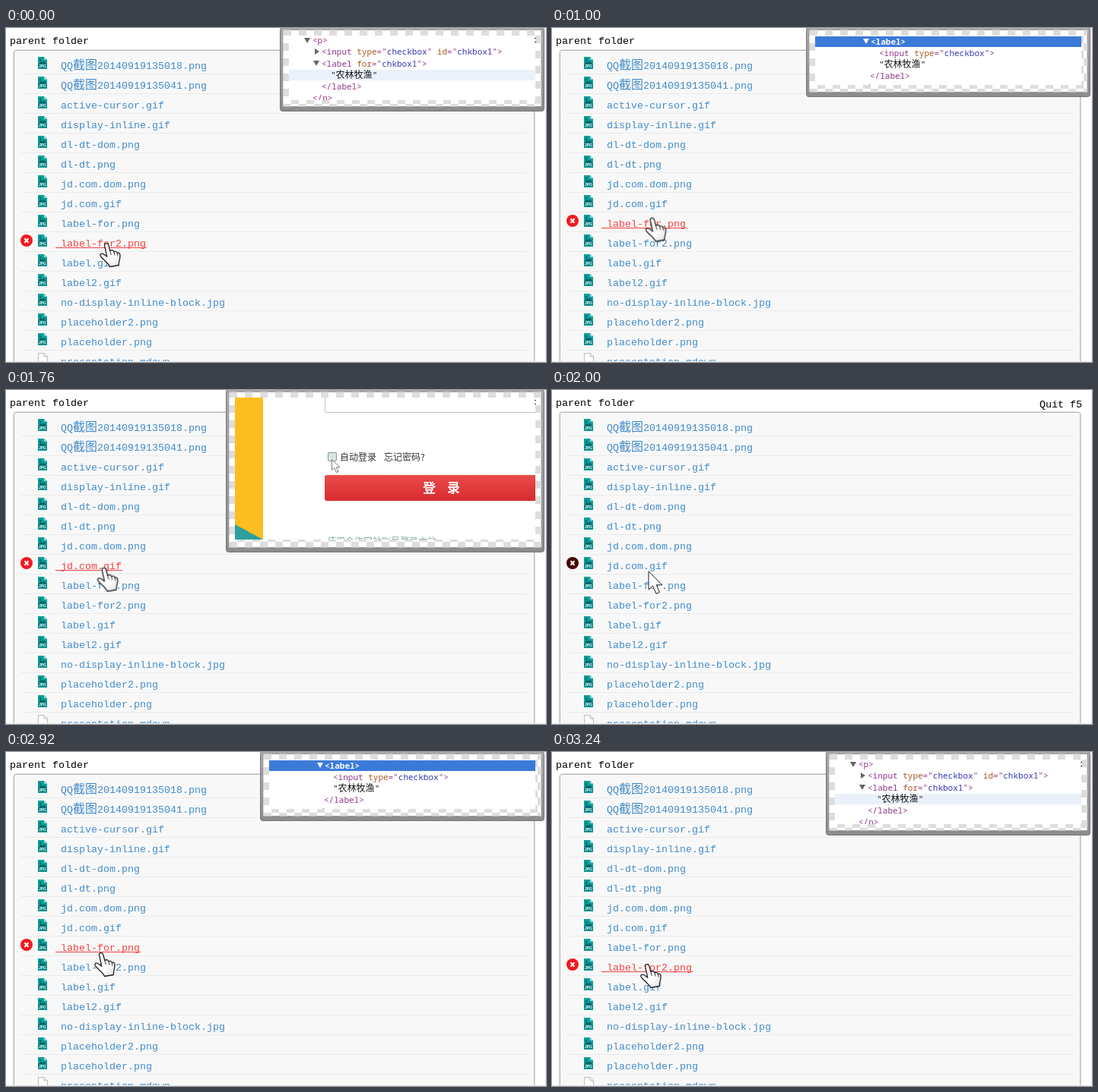
Recreate the animation shown at these times as an HTML page. Size 710 px wide and 440 px high, loop 3840 ms.

```html
<!DOCTYPE html>
<html lang="zh">
<head>
<meta charset="utf-8">
<title>parent folder</title>
<style>
  html, body { margin: 0; width: 100%; height: 100%; overflow: hidden; background: #fff; }
  svg { display: block; width: 710px; height: 440px; }
  text { white-space: pre; }
  .page { font: 13.333px "Liberation Mono", monospace; }
  .cjk { font-family: "Noto Sans CJK SC", "Noto Sans CJK", sans-serif; }
  .name { fill: #428bca; }
  .name .cjk { font-size: 16px; }
  .code { font: 11px "Noto Sans Mono", "Liberation Mono", monospace; fill: #90388a; }
  .code .cjk { font-size: 12px; }
  .attr { fill: #a35a28; }
  .val { fill: #3838b0; }
  .str { fill: #111; }
  .tiny { font: bold 5px "Liberation Sans", sans-serif; fill: #dff; }
  .form { font-size: 12px; fill: #333; }
</style>
</head>
<body>
<svg id="stage" viewBox="0 0 710 440">
  <defs>
    <pattern id="checks" x="5" width="20" height="20" patternUnits="userSpaceOnUse">
      <path d="M0 0h10v10H0zM10 10h10v10H10z" fill="#ddd"/>
    </pattern>
    <linearGradient id="frame" x2="0" y2="1">
      <stop stop-color="#aaa"/><stop offset="1" stop-color="#8c8c8c"/>
    </linearGradient>
    <linearGradient id="button" x2="0" y2="1">
      <stop stop-color="#e94c4a"/><stop offset="1" stop-color="#d92b30"/>
    </linearGradient>
    <linearGradient id="skin" x2="1" y2="1">
      <stop offset=".6" stop-color="#fff"/><stop offset="1" stop-color="#ddd"/>
    </linearGradient>
    <filter id="soft" x="-5%" y="-5%" width="110%" height="110%">
      <feDropShadow dx="0" dy="0" stdDeviation="1.2" flood-opacity=".3"/>
    </filter>
    <g id="image">
      <path d="M42 38h8l4 4v12H42z" fill="#0a9f9a"/>
      <path d="M50 38l4 4h-4z" fill="#8fd6d2"/>
      <path d="M43 47.500l3-4 2 2 2-2 3 4z" fill="#075f64"/>
      <circle cx="45" cy="42" r="1.2" fill="#075f64"/>
      <path d="M42 48h12v5H42z" fill="#08807f"/>
      <text class="tiny" x="43" y="52.400">JPG</text>
    </g>
    <path id="sheet" d="M42.500 38.500h7.500l4.500 4.500v11h-12zM50 38.500v4.500h4.500" fill="#fff" stroke="#bbb"/>
    <path id="pointer" d="M0 0V24L5.500 19 10 29.500 14.500 27.500 10.300 17.800H18z" fill="url(#skin)" stroke="#222" stroke-linejoin="round"/>
  </defs>
  <path d="M709.500 0V440M0 439.500H710" stroke="#e6e6e6"/>
  <g class="page">
    <text x="5" y="21">parent folder</text>
    <text x="641" y="23">Quit f5</text>
  </g>
  <svg width="710" height="439">
    <rect x="10.500" y="29.500" width="684" height="430" rx="3" fill="#f8f8f8" stroke="#b4b4b4" filter="url(#soft)"/>
    <g id="rows" class="page"></g>
  </svg>
  <g id="popups"></g>
  <g id="cursor">
    <g id="hand" transform="translate(-8)">
      <path d="M6.500 3C6.500-.3 11-.3 11.800 3L13.800 10.500C16.500 9 18.500 10 19 12 21 10.700 22.800 11.500 23.300 13.500 25.500 12.500 27 14 27 16.500 27.200 22 25 24.500 25.300 29.500L13.500 31.500C12.500 27 5 22.500 1.500 18 -.5 15 2.500 13 5.500 15L9.800 18.300z" fill="url(#skin)" stroke="#222" stroke-width="1.300" stroke-linejoin="round"/>
      <path d="M13.800 10.500l1.500 5.500M19 12l1 4.500M23.300 13.500l.7 4" fill="none" stroke="#333"/>
    </g>
    <use id="arrow" href="#pointer"/>
  </g>
</svg>
<script>
const LOOP = 3840, STEP = 40;
const $ = id => document.getElementById(id);

// keys: [ms, style]; each stretch advances in 40 ms steps
function loop(el, keys) {
  el.animate(keys.map(([ms, style], i) => {
    const next = keys[i + 1] || [ms];
    const steps = Math.max(1, Math.round((next[0] - ms) / STEP));
    return { ...style, offset: ms / LOOP, easing: `steps(${steps})` };
  }), { duration: LOOP, iterations: Infinity });
}

// on during the given spans, off otherwise
function during(el, spans, on = { opacity: 1 }, off = { opacity: 0 }) {
  const at = ms => spans.some(([a, b]) => a <= ms && ms < b) ? on : off;
  const cuts = spans.flat().filter(ms => ms > 0 && ms < LOOP);
  const edges = cuts.flatMap(ms => [[ms, at(ms - 1)], [ms, at(ms)]]);
  loop(el, [[0, at(0)], ...edges, [LOOP, at(LOOP - 1)]]);
}

const shot = time => `QQ<tspan class="cjk">截图</tspan>20140919${time}.png`;
const files = [shot(135018), shot(135041), 'active-cursor.gif', 'display-inline.gif',
  'dl-dt-dom.png', 'dl-dt.png', 'jd.com.dom.png', 'jd.com.gif', 'label-for.png',
  'label-for2.png', 'label.gif', 'label2.gif', 'no-display-inline-block.jpg',
  'placeholder2.png', 'placeholder.png', 'presentation.mdown'];

$('rows').innerHTML = files.map((name, i) => `
  <g transform="translate(0 ${26 * i})">
    <path d="M19 60.500H685" stroke="#ebebeb"/>
    <g class="badge" opacity="0" fill="#f5191f">
      <circle cx="27" cy="46" r="8"/>
      <path d="M24.500 43.300l5 5.400m0-5.400l-5 5.400" stroke="#fff" stroke-width="2"/>
    </g>
    <use href="#${i < 15 ? 'image' : 'sheet'}"/>
    <g class="name">
      <text x="72" y="54">${name}</text>
      <rect class="line" x="65" y="55" width="${8 + 8 * name.length}" height="1" opacity="0"/>
    </g>
  </g>`).join('');

const attr = (name, value) =>
  ` <tspan class="attr">${name}</tspan>="<tspan class="val">${value}</tspan>"`;
const code = (x, y, body) => `<text class="code" x="${x}" y="${y}">${body}</text>`;
const tag = (x, y, name, attrs = '') => code(x, y, `&lt;${name}${attrs}&gt;`);
const label = (x, y) =>
  code(x, y, '<tspan class="str">"<tspan class="cjk">农林牧渔</tspan>"</tspan>');
const open = (x, y, fill = '#666') => `<path d="M${x} ${y}h8l-4 7z" fill="${fill}"/>`;
const peek = '<path d="M695 13h2v1h-2zM695 18h2v1h-2z" fill="#333"/>';

const forPanel = `
  <path d="M372 55h324v14H372z" fill="#eaf1fa"/>
  ${open(392, 13)}${tag(403, 20, 'p')}
  <path d="M406 27l6 4-6 4z" fill="#666"/>
  ${tag(415, 35, 'input', attr('type', 'checkbox') + attr('id', 'chkbox1'))}
  ${open(404, 43)}${tag(415, 51, 'label', attr('for', 'chkbox1'))}
  ${label(427, 66)}${tag(415, 81, '/label')}${tag(403, 96, '/p')}`;

const wrapPanel = `
  <path d="M346 11h350v14H346z" fill="#3b7ad9"/>
  ${open(409, 14, '#fff')}
  ${code(419, 22, '<tspan fill="#fff" font-weight="600">&lt;label&gt;</tspan>')}
  ${tag(430, 37, 'input', attr('type', 'checkbox'))}
  ${label(430, 52)}${tag(418, 67, '/label')}
  <path d="M417 74h1v1h-1z" fill="#666"/>`;

const loginPanel = `
  <path d="M301 10h37v187h-37z" fill="#fbbd20"/>
  <path d="M301 177l37 20h-37z" fill="#2f9f9f"/>
  <path d="M419.500 10v19.500H696" fill="none" stroke="#c4c4c4"/>
  <rect x="423.500" y="82.500" width="11" height="11" rx="1.500" fill="#dbe6e2" stroke="#8a9a98"/>
  <g class="cjk form">
    <text x="439" y="93">自动登录</text>
    <text x="497" y="93">忘记密码?</text>
    <text x="422" y="204" fill="#7fa9a4">使用合作网站账号登录本站</text>
  </g>
  <path d="M419 115q0-3 3-3H696v34H422q-3 0-3-3z" fill="url(#button)"/>
  <g class="cjk" font-size="17" font-weight="bold" fill="#fff">
    <text x="548" y="135">登</text><text x="580" y="135">录</text>
  </g>
  <use href="#pointer" transform="translate(428.500 91.500) scale(.58)"/>`;

function popup(x, height, bottom, body, extra = '') {
  const id = 'view' + x, left = x + 12;
  const box = `x="${left}" y="10" width="${696 - left}" height="${bottom - 10}"`;
  const ring = `x="4" y="2.500" width="${700 - x}" height="${height - 9}"`;
  return `<g opacity="0" class="popup">
    <clipPath id="${id}"><rect ${box}/></clipPath>
    <g transform="translate(${x})">
      <rect x=".5" y="-.5" width="${707 - x}" height="${height}" rx="3" fill="url(#frame)" stroke="#777"/>
      <rect ${ring} fill="#fff" stroke="#999"/>
      <rect ${ring} fill="url(#checks)"/>
    </g>
    <rect ${box} fill="#fff"/>
    <g clip-path="url(#${id})">${body}</g>${extra}
  </g>`;
}

$('popups').innerHTML = popup(360, 110, 95, forPanel, peek)
  + popup(334, 91, 75, wrapPanel)
  + popup(289, 214, 197, loginPanel, peek);

// when the cursor rests on each link
const visits = {
  9: [[0, 480], [3040, LOOP]],
  8: [[520, 1080], [2200, 2960]],
  7: [[1160, 1800]]
};
const gaps = [[480, 520], [1080, 1160], [1800, 2200], [2960, 3040]];

const popups = document.querySelectorAll('.popup');
const rows = $('rows').children;
[9, 8, 7].forEach((row, i) => {
  during(popups[i], visits[row]);
  during(rows[row].querySelector('.name'), visits[row], { fill: '#f5403f' }, { fill: '#428bca' });
  during(rows[row].querySelector('.line'), visits[row]);
});
during($('arrow'), gaps);
during($('hand'), gaps, { opacity: 0 }, { opacity: 1 });

const red = '#f5191f', dark = '#480000';
const badge = (row, keys) => loop(rows[row].querySelector('.badge'),
  keys.map(([ms, opacity, fill = red]) => [ms, { opacity, fill }]));
badge(9, [[0, 1], [480, 1], [520, .8], [680, 0], [2960, 0, dark], [3200, 1], [LOOP, 1]]);
badge(8, [[0, 0], [480, 0, dark], [520, .4, '#c01818'], [680, 1], [1120, 1], [1160, .6],
  [1320, 0], [2120, 0, dark], [2320, 1], [2960, 1], [3160, 0], [LOOP, 0]]);
badge(7, [[0, 0], [1080, 0], [1160, .6], [1320, 1], [1800, 1], [1960, 1, dark],
  [2120, 1, dark], [2280, 0, dark], [LOOP, 0]]);

const path = [[0, 131, 283], [360, 131, 283], [520, 142, 262], [760, 131, 253], [960, 131, 253],
  [1160, 129, 236], [1360, 128, 231], [1720, 128, 231], [1840, 127, 239], [2040, 127, 239],
  [2280, 126, 254], [2880, 126, 254], [2920, 124, 264], [3040, 124, 275], [3240, 124, 279],
  [LOOP, 124, 279]];
loop($('cursor'), path.map(([ms, x, y]) => [ms, { transform: `translate(${x}px, ${y}px)` }]));
</script>
</body>
</html>
```
